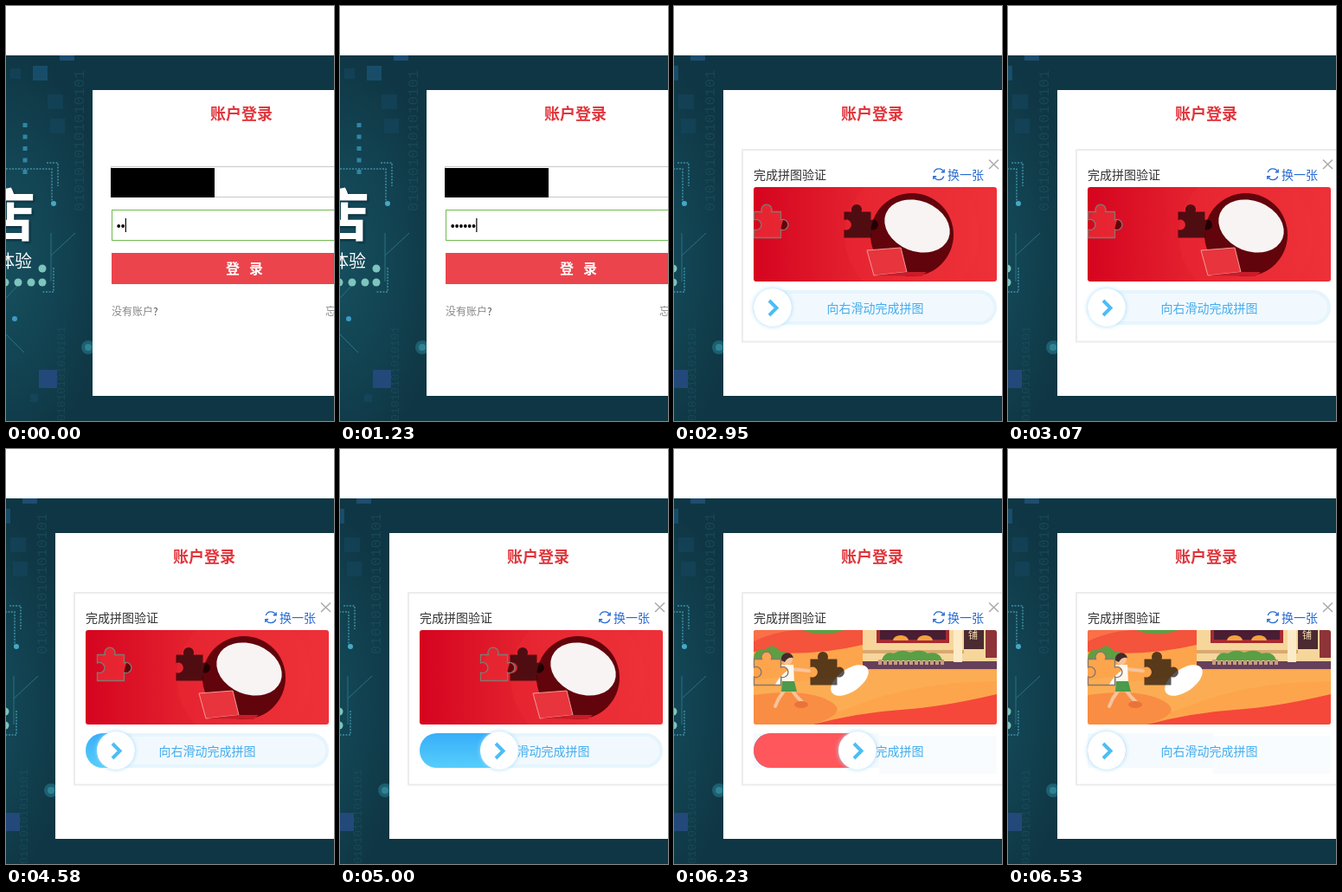
Write an HTML page that moves like this. It is 379 px wide and 479 px high and loops after 8000 ms.

```html
<!DOCTYPE html>
<html lang="zh-CN">
<head>
<meta charset="utf-8">
<title>账户登录</title>
<style>
@property --x { syntax: "<number>"; inherits: true; initial-value: 0; }
@property --n { syntax: "<number>"; inherits: true; initial-value: 2; }

html, body { margin: 0; width: 100%; height: 100%; overflow: hidden; background: #fff; }
svg { display: block; width: 379px; height: 479px; font-family: "Noto Sans CJK SC", "Noto Sans CJK", "Noto Sans", sans-serif; }

svg, .page, .login, .verify, .red, .first, .second { animation: 8s step-end infinite; }
svg { animation-name: drag, type; }
.page { animation-name: shift; }
.login { animation-name: leave; }
.verify { animation-name: enter; }
.red { animation-name: fail; }
.first { animation-name: drop; }
.second { animation-name: renew; }

.typed { transform: translateX(calc(var(--n) * 4.875px)); }
.slide { transform: translateX(calc(var(--x) * 1px)); }
.fill { width: calc(var(--x) * 1px + 44px); }
.knob { filter: drop-shadow(0 0 2.5px #a3dbf8); }
.outline { fill: none; stroke: #84776f; stroke-width: 1.3; }
.slot { fill: #000; fill-opacity: .65; }

@keyframes type {
  0% { --n: 2 } 1.875% { --n: 3 } 8.5% { --n: 4 } 10.375% { --n: 5 } 15.375% { --n: 6 }
  20.75% { --n: 7 } 26.125% { --n: 8 } 27.625% { --n: 9 } 31.5%, to { --n: 10 }
}
@keyframes drag {
  0% { --x: 0 } 55.75% { --x: 5 } 57.25% { --x: 13 } 59.125% { --x: 30 } 60.625% { --x: 47 }
  62.5% { --x: 70 } 64.375% { --x: 91 } 66.25% { --x: 103.5 } 77.875% { --x: 98 }
  79.75% { --x: 24 } 81.625%, to { --x: 0 }
}
@keyframes shift { 0% { transform: none } 36.875%, to { transform: translateX(-43px) } }
@keyframes leave { 0% { opacity: 1 } 36.875%, to { opacity: 0 } }
@keyframes enter { 0% { opacity: 0 } 36.875%, to { opacity: 1 } }
@keyframes fail { 0% { opacity: 0 } 71.25%, to { opacity: 1 } }
@keyframes drop { 0% { opacity: 1 } 77.875%, to { opacity: 0 } }
@keyframes renew { 0% { opacity: 0 } 77.875%, to { opacity: 1 } }
</style>
</head>
<body>
<svg viewBox="0 0 379 479">
  <defs>
    <radialGradient id="night" gradientUnits="userSpaceOnUse" cx="-10" cy="290" r="240" gradientTransform="translate(-10 290) scale(.55 1) translate(10 -290)">
      <stop stop-color="#17505f"/><stop offset=".45" stop-color="#134655"/><stop offset="1" stop-color="#0f3644"/>
    </radialGradient>
    <linearGradient id="scarlet">
      <stop stop-color="#d5041f"/><stop offset=".4" stop-color="#e3202e"/><stop offset="1" stop-color="#ee3139"/>
    </linearGradient>
    <linearGradient id="azure" x2="0" y2="1">
      <stop stop-color="#38aefa"/><stop offset="1" stop-color="#56cefb"/>
    </linearGradient>
    <clipPath id="frame"><rect x="92" y="209" width="281" height="109" rx="3"/></clipPath>
    <path id="jigsaw" d="M92.5 237.5H101.5A6 6 0 1 1 112.5 237.5H123.5V247A6 6 0 1 1 123.5 258V267.5H92.5V258A6 6 0 1 0 92.5 247Z"/>
    <clipPath id="cut"><use href="#jigsaw"/></clipPath>
  </defs>

  <g class="page">
    <rect y="57" width="430" height="422" fill="url(#night)"/>
    <g fill="#184d6a">
      <rect x="31" y="69" width="17" height="17"/>
      <rect x="62" y="57" width="17" height="6" fill="#1d4d70"/>
      <rect x="48" y="102" width="18" height="17" opacity=".4"/>
      <rect x="51" y="130" width="17" height="17" opacity=".4"/>
      <rect x="5" y="72" width="12" height="12" opacity=".4"/>
      <rect x="38" y="420" width="21" height="21" fill="#23497a"/>
      <rect x="28" y="448" width="9" height="9" opacity=".5"/>
    </g>
    <g fill="#215766" font-family="'Liberation Mono', monospace" opacity=".5">
      <text transform="translate(90 237) rotate(-90)" font-size="17">0101010101010101</text>
      <text transform="translate(68 479) rotate(-90)" font-size="13">01010101010101</text>
    </g>
    <g fill="none" stroke="#3d8fa5">
      <path d="M22 135V196" stroke="#3085a3" stroke-width="5" stroke-dasharray="5 8.5"/>
      <path d="M0 188H53V228M47 181H60V208M55 302V330H42" stroke-width="1.5" stroke-dasharray="2 1.5"/>
      <path d="M52 262V318M52 288L80 262M0 379L21 400M0 337L18 318" stroke="#2b7283"/>
    </g>
    <circle cx="55" cy="228" r="3" fill="#46a8c4"/>
    <circle cx="10" cy="361" r="3" fill="#399bc5"/>
    <circle cx="95" cy="394" r="8" fill="#1d5f70"/>
    <circle cx="95" cy="394" r="4" fill="#2f8292"/>
    <g fill="#7dc5bd">
      <circle cx="42" cy="303" r="4.5"/><circle cx="-1" cy="319" r="4.5"/><circle cx="14" cy="319" r="4.5"/>
      <circle cx="29" cy="319" r="4.5"/><circle cx="42" cy="319" r="4.5"/>
    </g>
    <g fill="#fff" text-anchor="end">
      <text x="34" y="265.5" font-size="66" font-weight="900" style="filter:drop-shadow(2px 2px 1px #0b3140)">店</text>
      <text x="30" y="302" font-size="20">体验</text>
    </g>
    <rect x="100" y="97" width="330" height="353" fill="#fff"/>
    <text x="236" y="131" font-size="18" font-weight="700" fill="#e0363c">账户登录</text>

    <g class="login">
      <rect x="121.5" y="185.5" width="300" height="35" fill="none" stroke="#c9c9c9"/>
      <rect x="121" y="187" width="120" height="34"/>
      <rect x="122.5" y="235.5" width="300" height="35" fill="#fff" stroke="#70bb50"/>
      <path d="M130.2 254H176" stroke="#000" stroke-width="3.8" stroke-linecap="round" stroke-dasharray="0 4.875"/>
      <g class="typed">
        <rect x="127.8" y="245" width="60" height="18" fill="#fff"/>
        <rect x="128" y="245" width="1.2" height="16"/>
      </g>
      <rect x="122" y="285" width="300" height="36" fill="#ec444c"/>
      <g font-size="16" font-weight="700" fill="#fff"><text x="254" y="309">登</text><text x="281" y="309">录</text></g>
      <g font-size="12" fill="#888"><text x="122" y="357">没有账户<tspan fill="#555">?</tspan></text><text x="369" y="357">忘记密码</text></g>
    </g>
  </g>

  <g class="verify">
    <rect x="79" y="166" width="320" height="221.5" fill="#fff" stroke="#ececee" stroke-width="2"/>
    <g font-size="14">
      <text x="92" y="200" fill="#333">完成拼图验证</text>
      <text x="316" y="200" fill="#286bd2">换一张</text>
    </g>
    <g fill="none" stroke="#286bd2" stroke-width="1.4">
      <path d="M300.3 192A6 6 0 0 1 311.5 191.5M311.7 196.5A6 6 0 0 1 300.5 197"/>
      <path d="M308.8 191.8H312.2V188.5M303.2 196.7H299.8V200"/>
    </g>
    <path d="M364 177.500L375 188M375 177.500L364 188" stroke="#aaa" stroke-width="1.5"/>

    <g class="first">
      <g id="banner" clip-path="url(#frame)">
        <rect x="92" y="209" width="281" height="109" fill="url(#scarlet)"/>
        <circle cx="275" cy="264" r="78" fill="#f0383f" opacity=".2"/>
        <circle cx="275" cy="264" r="48" fill="#62040b"/>
        <ellipse cx="281" cy="254" rx="39" ry="29" transform="rotate(22 281 254)" fill="#f7f4f3"/>
        <path d="M223 282L262 279L269 307L231 311Z" fill="#e8343c" stroke="#f39a98"/>
        <path d="M231 311L269 307H292L286 312Z" fill="#c91c29"/>
      </g>
      <use href="#jigsaw" x="104" class="slot"/>
      <g class="slide">
        <g clip-path="url(#cut)"><use href="#banner" x="-104"/></g>
        <use href="#jigsaw" class="outline"/>
      </g>
      <rect x="94" y="330" width="277" height="36" rx="18" fill="#f2f9fe" stroke="#e6f5fd" stroke-width="4"/>
    </g>

    <g class="second">
      <g id="street" clip-path="url(#frame)">
        <rect x="92" y="209" width="281" height="109" fill="#fda54c"/>
        <path d="M92 209H218V226Q160 240 92 234Z" fill="#f4533c"/>
        <path d="M92 222Q125 206 168 209H92Z" fill="#fa7048"/>
        <path d="M148 209Q172 218 197 209Z" fill="#5f9e42"/>
        <path d="M92 243Q92 230 105 232Q114 222 123 234Q133 233 135 243Z" fill="#5f9e42"/>
        <path d="M92 272Q170 268 225 256H373V268Q280 268 210 296T92 306Z" fill="#fcad54"/>
        <path d="M92 284Q150 276 178 290T160 318H92Z" fill="#f98d43"/>
        <path d="M160 318Q215 304 262 301T373 283V318Z" fill="#f5483a"/>
        <path d="M218 209H373V246H218Z" fill="#f6d69b"/>
        <path d="M234 209H318V224H234Z" fill="#a62b32"/>
        <path d="M238 209H314V220H238Z" fill="#4a1d33"/>
        <path d="M253 221a9 6 0 0 1 18 0M281 221a9 6 0 0 1 18 0" fill="#f5a33f"/>
        <path d="M218 232H335V236H218Z" fill="#d9a972"/>
        <path d="M218 245H373V254H218Z" fill="#66405a"/>
        <path d="M236 246H312" stroke="#c99c80" stroke-width="6" stroke-dasharray="4 2"/>
        <path d="M240 244Q243 233 254 236Q263 230 273 235Q285 230 293 236Q307 233 310 244Z" fill="#58a045"/>
        <path d="M323 209H333V246H323Z" fill="#fcebc8"/>
        <path d="M335 209H358V231H335Z" fill="#4b2b31"/>
        <path d="M360 209H373V241H360Z" fill="#8e3439"/>
        <text x="340" y="219" font-size="11" fill="#f7dfb3">铺</text>
        <g fill="none" stroke="#f7c39a" stroke-width="4" stroke-linecap="round">
          <path d="M126 254L113 264M136 254L156 256M128 278L121 288L117 297M136 278L142 286L148 292"/>
        </g>
        <ellipse cx="147" cy="295" rx="8" ry="4" fill="#e97339"/>
        <path d="M124 249H138L139 270H125Z" fill="#fff8ed"/>
        <path d="M125 268H139L142 280H124Z" fill="#4c9a4b"/>
        <circle cx="131" cy="243" r="6" fill="#f7c39a"/>
        <path d="M124 244A7 7 0 0 1 138 241Q131 240 128 246Z" fill="#432a2c"/>
        <ellipse cx="203" cy="267" rx="25" ry="13" transform="rotate(-35 203 267)" fill="#fff"/>
      </g>
      <use href="#jigsaw" x="65" y="5" class="slot"/>
      <g transform="translate(0 5)">
        <g clip-path="url(#cut)"><use href="#street" x="-65" y="-5"/></g>
        <use href="#jigsaw" class="outline"/>
      </g>
      <rect x="92" y="328" width="145" height="40" fill="#f4fafe"/>
      <rect x="237" y="331" width="136" height="44" fill="#f8fcfe"/>
    </g>

    <text x="176.500" y="353.500" font-size="14" fill="#43adee">向右滑动完成拼图</text>
    <rect class="fill" x="92" y="328" height="40" rx="20" fill="url(#azure)"/>
    <g class="red"><rect class="fill" x="92" y="328" height="40" rx="20" fill="#ff575b"/></g>
    <g class="slide">
      <circle class="knob" cx="114" cy="348" r="22" fill="#fff"/>
      <path d="M110 340L118.500 348.500L110 357" fill="none" stroke="#4cbef5" stroke-width="4"/>
    </g>
  </g>
</svg>
</body>
</html>
```
